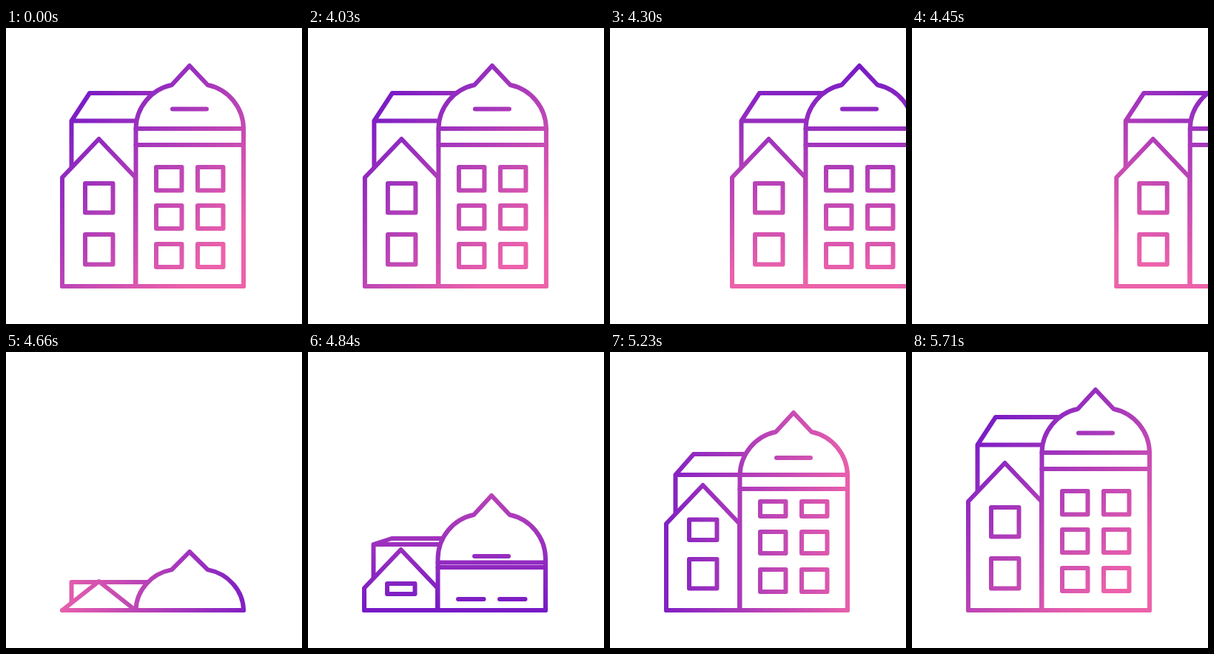
An HTML page for the animation above (5740 ms loop, 400 by 400 pixels).

```html
<!DOCTYPE html>
<html lang="en">
<head>
<meta charset="utf-8">
<title>Buildings</title>
<style>
  html, body { margin: 0; width: 100%; height: 100%; overflow: hidden; background: #fff; }
  svg { display: block; width: 100%; height: 100%; }
  path { fill: none; stroke: url(#ink); stroke-width: 6; stroke-linecap: round; stroke-linejoin: round; }
  .solid { fill: #fff; }
</style>
</head>
<body>
<svg viewBox="0 0 400 400">
  <defs>
    <linearGradient id="ink" gradientUnits="userSpaceOnUse" x1="-165" y1="0" x2="135" y2="0">
      <stop offset="0" stop-color="#7016c8"/>
      <stop offset="1" stop-color="#ec62aa"/>
    </linearGradient>
  </defs>
  <g id="city">
    <path id="back"/>
    <path id="house" class="solid"/>
    <path id="tower" class="solid"/>
    <path id="details"/>
  </g>
</svg>
<script>
const LOOP = 5740, START = 4000, STEP = 30, EXIT = 20, FLOOR = 349;
const $ = id => document.getElementById(id);
const [ink, city, back, house, tower, details] =
  ['ink', 'city', 'back', 'house', 'tower', 'details'].map($);

// Smooth monotone curve through the given points, flat at its end.
function curve(xs, ys, startSlope) {
  const last = xs.length - 1;
  const h = i => xs[i + 1] - xs[i];
  const d = i => (ys[i + 1] - ys[i]) / h(i);
  const slope = xs.map((_, i) => {
    if (i === 0) return startSlope ?? d(0);
    if (i === last) return 0;
    const a = d(i - 1), b = d(i);
    const m = (a * h(i) + b * h(i - 1)) / (h(i) + h(i - 1));
    return Math.sign(m) * Math.min(Math.abs(m), 3 * Math.abs(a), 3 * Math.abs(b));
  });
  return x => {
    if (x <= xs[0]) return ys[0];
    if (x >= xs[last]) return ys[last];
    let i = 0;
    while (x > xs[i + 1]) i++;
    const w = h(i), t = (x - xs[i]) / w, s = 1 - t;
    return s * s * ((1 + 2 * t) * ys[i] + t * w * slope[i])
         + t * t * ((1 + 2 * s) * ys[i + 1] - s * w * slope[i + 1]);
  };
}

// Height that leaves the floor at a given step and settles.
const rise = (from, a, b, c) => curve([from, 8, 21, 35], [FLOOR, a, b, c]);

const angle = curve([0, 10, 22, 28, 41, 57], [45, 90, 180, 270, 360, 405], 1.5);
const apex = curve([0, 2, 8, 21, 34], [300, 270, 194, 82, 51]);
const band = [rise(3.4, 284.5, 166, 136), rise(3.4, 291, 185, 158)];
const dash = rise(3, 276, 143, 109.5);
const wall = rise(4.8, 319, 232, 202);
const eave = curve([0, 2, 8, 21, 36], [FLOOR, 311, 260, 166, 125.5]);
const ridge = curve([4, 8, 21, 36], [0, 8, 28, 37.5]);

const pane = (x, w, top, bottom) => ({ x, w, top, bottom });
const panes = [
  pane(107, 37.5, rise(5, 313, 226.5, 210), rise(6, 327, 254, 249.5)),
  pane(107, 37.5, rise(5, 313, 280, 279), rise(6, 327, 319.5, 319.5))
];
for (const x of [203, 259]) {
  panes.push(
    pane(x, 34.5, rise(4, 334, 202, 188), rise(4, 334, 222, 219.5)),
    pane(x, 34.5, rise(4, 334, 243, 240), rise(4, 334, 272, 271)),
    pane(x, 34.5, rise(4, 334, 294, 292), rise(4, 334, 324, 323))
  );
}

const hline = (x1, x2, y) => `M${x1} ${y}H${x2}`;
const set = (el, d) => el.setAttribute('d', d);

function build(u) {
  const e = eave(u), top = e - ridge(u);
  set(back, `M88.5 ${FLOOR}V${e}L113 ${top}H225${hline(88.5, 200, e)}`);

  const w = wall(u);
  const peak = w - 52 * (1 - (1 - Math.min(1, Math.max(0, u / 4))) ** 2);
  set(house, `M76 ${FLOOR}V${w}L125.5 ${peak}L175 ${w}V${FLOOR}Z`);

  const a = apex(u), base = Math.min(FLOOR, a + 85), k = (base - a) / 85;
  const arc = `A61 ${61 * k} 0 0 1`, neck = base - 59 * k;
  set(tower, `M175.5 ${FLOOR}V${base}${arc} 224 ${neck}L248 ${a}L272.5 ${neck}${arc} 321 ${base}V${FLOOR}Z`);

  const rows = band.map(f => hline(175.5, 321, f(u))).join('');
  const windows = panes.map(p => {
    const y = p.top(u);
    return `M${p.x} ${y}h${p.w}V${p.bottom(u)}h${-p.w}Z`;
  }).join('');
  set(details, rows + hline(225, 271, dash(u)) + windows + hline(76, 321, FLOOR));
}

function draw(time) {
  const n = Math.max(0, Math.floor((time % LOOP - START) / STEP));
  const leaving = n <= EXIT;
  city.setAttribute('transform', `translate(${leaving ? 0.89 * n * n : 0} 0)`);
  ink.setAttribute('gradientTransform', `translate(198 200) rotate(${angle(n)})`);
  build(leaving ? 40 : n - EXIT);
}

const origin = performance.now();
function tick() {
  draw(performance.now() - origin);
  requestAnimationFrame(tick);
}
tick();
</script>
</body>
</html>
```
